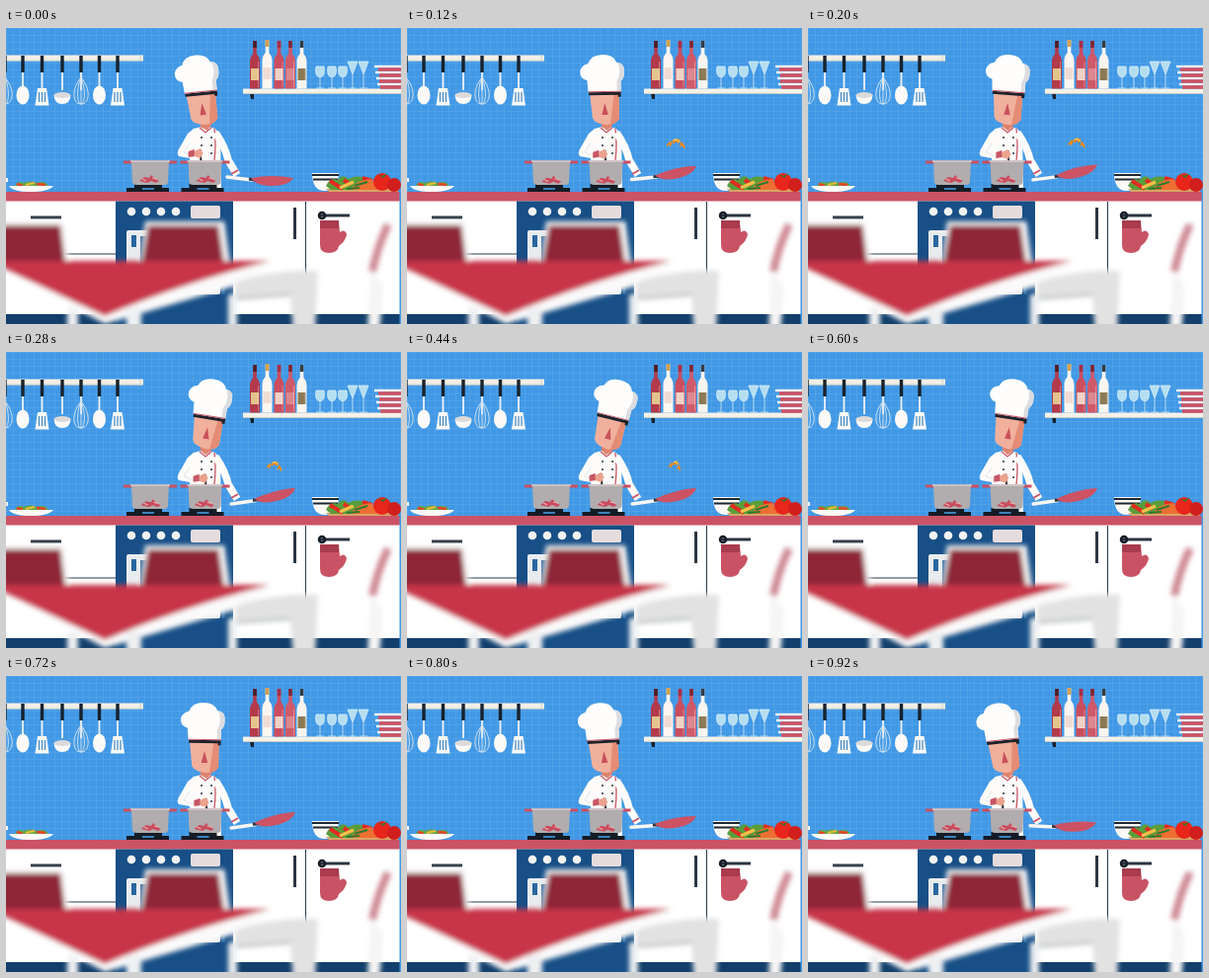
Recreate the animation shown at these times as an HTML page. Size 400x300 px, loop 0.96 s.

```html
<!DOCTYPE html>
<html lang="en">
<head>
<meta charset="utf-8">
<title>Chef</title>
<style>
html, body { margin: 0; width: 100%; height: 100%; overflow: hidden; background: #4198e5; }
svg { display: block; width: 100%; height: 100%; }
</style>
</head>
<body>
<svg viewBox="0 0 400 300">
  <defs>
    <pattern id="tiles" width="7" height="7" patternUnits="userSpaceOnUse">
      <path d="M0 .5H7M.5 0V7" stroke="#54a5ea" stroke-width=".7"/>
    </pattern>
    <filter id="blur" x="-10%" y="-30%" width="120%" height="160%"><feGaussianBlur stdDeviation="2.6"/></filter>
    <g id="handle"><path d="M0 42V63" stroke="#eef2f4" stroke-width="1.8"/><path d="M0 28V45" stroke="#17222d" stroke-width="3.4"/></g>
    <g id="spoon"><use href="#handle"/><ellipse cy="68" rx="6.5" ry="9.5" fill="#fbfaf8"/></g>
    <g id="spatula"><use href="#handle"/><path d="M-4.500 61H4.500L7 78.500H-7Z" fill="#fbfaf8"/><path d="M-3 65V75M0 65V75M3 65V75" stroke="#3f86bf" stroke-width="1.2"/></g>
    <g id="ladle"><use href="#handle"/><path d="M-8.500 68Q-8 77 0 77T8.500 68Z" fill="#fbfaf8"/><ellipse cy="68" rx="8.500" ry="3" fill="#dcdad8"/></g>
    <g id="whisk"><use href="#handle"/><path d="M0 50C-10 62-9 77 0 77S10 62 0 50C-5 62-4 77 0 77S5 62 0 50V77" fill="none" stroke="#dce9f2" stroke-width=".9"/></g>
    <g id="wine" fill="#b5def0" stroke="#d3edf6" stroke-width=".8"><path d="M-4 39H4Q6 49 0 50Q-6 49-4 39ZM0 50V61M-4 61H4"/></g>
    <g id="martini" fill="#b5def0" stroke="#d3edf6" stroke-width=".8"><path d="M-5 34H5L0 47ZM0 47V61M-4 61H4"/></g>
    <g id="stand" fill="#141c26"><path d="M-14 158H14V162H21V167H-22V162H-14Z"/><path d="M-6 163H6" stroke="#4ba3e8" stroke-width="1.500"/></g>
  </defs>

  <rect width="400" height="300" fill="#4198e5"/>
  <rect width="400" height="166" fill="url(#tiles)"/>

  <g id="rail">
    <rect y="27.500" width="139" height="6" fill="#f2f0e6"/><path d="M0 33H139" stroke="#cfd0c8"/>
    <path d="M136 27.500V33.500" stroke="#d2d2ca"/>
  </g>

  <g id="shelf">
    <path d="M247 66H251V72H248Z" fill="#1a222c"/>
    <rect x="240" y="61.500" width="160" height="5" fill="#f5f2e8"/><path d="M240 66.500H400" stroke="#cbcac0"/>
    <path d="M373 39H400M374 45H400M375 51H400M376 57H400" stroke="#fbf8f5" stroke-width="2.5"/>
    <path d="M377 42H400M378 48H400M378 54H400M379 60H400" stroke="#cf5263" stroke-width="3.5"/>
  </g>

  <g id="chef">
    <path d="M190 102Q202 98 212 102L217 109L218 166H187L186 132L175 130Q172 127 176 121L184 107Z" fill="#fdfcfa"/>
    <path d="M186 117L180 126L190 130" fill="none" stroke="#dadde1" stroke-width=".8"/>
    <path d="M196 101L202 106L208 101M211 102Q213 118 211 134" fill="none" stroke="#c75666" stroke-width="1.3"/>
    <g fill="#29323d"><circle cx="198" cy="111" r="1"/><circle cx="208" cy="111" r="1"/><circle cx="198" cy="119" r="1"/><circle cx="208" cy="119" r="1"/><circle cx="208" cy="127" r="1"/></g>
    <path d="M212 106Q222 120 225 134L234 149" fill="none" stroke="#fdfcfa" stroke-width="7.500"/>
    <path d="M228 148L235 144" stroke="#c75666" stroke-width="2"/>
    <g id="head">
      <path d="M197 92H208V99L203 104L197 100Z" fill="#e0836e"/>
      <path d="M185.500 66H215V92Q212 98 202 98Q190 97 188 91Z" fill="#f0b09c"/>
      <path d="M210 66H215V92Q213 97 206 98Z" fill="#e58c74"/>
      <path d="M200.500 76L204 88H197.500Z" fill="#c9505b"/>
      <path d="M184.500 64H217V70H214V68H184.500Z" fill="#1d232c"/>
      <path d="M184 65L183 53Q175 51 176 43Q178 37 184 36Q187 27 199 27Q210 27 213 35Q221 36 220.500 44Q221 51 217 54V65Z" fill="#fefdfb"/>
      <path d="M214 35Q221 36 220.500 44Q221 51 217 54V64H213V54Q218 46 214 35Z" fill="#dcdde0"/>
      <path d="M184 64.500H217" stroke="#c75666" stroke-width="1"/>
    </g>
    <g id="stir">
      <path d="M197 123L198 138" stroke="#252b34" stroke-width="2"/>
      <path d="M185 125L191 123L192 130L185 131Z" fill="#c75666"/>
      <path d="M191 125L197 122L200 127L197 132L191 130Z" fill="#eca28d"/>
    </g>
    <g id="pan">
      <path d="M224 151L249 154" stroke="#f9f6f2" stroke-width="3.500" stroke-linecap="round"/>
      <path d="M246 153L252 154" stroke="#2e3440" stroke-width="3"/>
      <path d="M248 152Q270 148 291 152Q286 160 270 160Q253 160 248 152Z" fill="#cd5263"/>
    </g>
    <g id="food">
      <path d="M-10 4Q-8-2-4-2L-5 4L-7 2ZM-4-2Q0-7 5-3L2 0L0-2L-3 1ZM5-2Q10 0 10 5L6 2L4 4Z" fill="#f08a1d"/>
      <path d="M-3-3L0-4L4-2" fill="none" stroke="#f9cf62" stroke-width="1.2"/>
    </g>
  </g>

  <g id="pots"></g>

  <g id="groceries">
    <path d="M0 152H2V156H0Z" fill="#f5f3ef"/>
    <path d="M9 160Q12 154 18 157Q25 154 31 157Q39 154 43 160Z" fill="#62a744"/>
    <path d="M11 158L17 160M31 158L40 159" stroke="#e8432a" stroke-width="2.5"/><path d="M20 159L29 157" stroke="#f0ba3d" stroke-width="2"/>
    <path d="M3 160H48Q43 166 25 166T3 160Z" fill="#fbf9f6"/>
    <path d="M310 147H337Q336 165 323 165T310 147Z" fill="#fbf9f6"/>
    <path d="M310 149H337M311 153.500H336" stroke="#1d2630" stroke-width="2"/>
    <path d="M324 163H397V167H328Z" fill="#d9a566"/>
    <path d="M324 160Q328 151 336 154Q341 147 347 153Q358 147 368 156L371 164H329Z" fill="#5a9e3b"/>
    <path d="M328 155L341 163M342 154L349 159M361 152L371 155" stroke="#e12c22" stroke-width="4"/>
    <path d="M338 162L352 156M362 163L372 158" stroke="#f3c14a" stroke-width="3.500"/>
    <path d="M350 164Q352 155 370 153L378 164Z" fill="#ee6f32"/>
    <path d="M353 160L366 156M345 163L358 162" stroke="#2f7a30" stroke-width="2"/>
    <circle cx="381" cy="156" r="9" fill="#e8261c"/><circle cx="393" cy="159" r="7" fill="#d11f1d"/>
    <path d="M376 148L381 150L387 147L382 152Z" fill="#2f7a30"/>
  </g>

  <g id="cabinets">
    <rect y="175" width="398.500" height="115" fill="#fff"/>
    <rect y="290" width="398.500" height="10" fill="#123f6b"/>
    <rect y="166" width="398.500" height="9.500" fill="#cb5365"/>
    <path d="M60 229H111M303.500 176V290" stroke="#26394a"/>
    <path d="M25 192H56M292.500 182V214" stroke="#2b3642" stroke-width="3"/>
    <rect x="111" y="175.500" width="119" height="125" fill="#174f86"/>
    <rect x="187" y="180" width="30" height="13" rx="2" fill="#e6dcde"/>
    <rect x="122" y="205" width="95" height="65" rx="2" fill="#e8ecef"/>
    <rect x="136" y="211" width="76" height="48" fill="#215f98"/>
    <rect x="127" y="210" width="5" height="12" fill="#2867a0"/>
    <path d="M220 198V270" stroke="#2f6fa8" stroke-width="3"/>
    <path d="M317 190H348" stroke="#2b3642" stroke-width="3"/>
    <circle cx="320" cy="190" r="3" fill="none" stroke="#141c26" stroke-width="2.5"/>
    <path d="M318 196H337L338 207Q343 203 345 209Q344 216 337 221Q336 228 327 228Q318 228 318 220Z" fill="#c95365"/>
    <path d="M318 195H337V203H318Z" fill="#a93b4e"/>
  </g>

  <g id="dining" filter="url(#blur)">
    <path d="M-10 196H58L65 245H-10ZM141 196H221L228 245H134Z" fill="#f5f3f2"/>
    <path d="M-10 200H55L60 240H-10ZM144 200H215L221 240H137Z" fill="#8e2538"/>
    <path d="M-10 240L100 300L240 259L268 238Z" fill="#fbfafa"/>
    <path d="M62 284H73V310H62ZM122 284H137V310H122ZM225 270H234V310H225Z" fill="#eef0f2"/>
    <path d="M232 258Q270 244 316 246L313 310H291L288 272L232 276Z" fill="#e2e2e2"/>
    <path d="M235 274L288 270" stroke="#bfc4c8" stroke-width="3"/>
    <path d="M392 196Q379 220 373 248L382 262L378 310H366L369 248Q377 215 386 196Z" fill="#f6f5f4"/>
    <path d="M387 199Q376 222 371 247" fill="none" stroke="#cf8a94" stroke-width="8"/>
    <path d="M-10 236H268Q180 258 100 292L-10 240Z" fill="#c83549"/>
  </g>
</svg>

<script>
const $ = id => document.getElementById(id);
const add = (id, markup) => $(id).insertAdjacentHTML('beforeend', markup);
const LOOP = 960, STEP = 40;

['whisk', 'spoon', 'spatula', 'ladle', 'whisk', 'spoon', 'spatula'].forEach((kind, i) =>
  add('rail', `<use href="#${kind}" x="${[-1, 17, 36.5, 57, 76, 94.5, 113][i]}"/>`));

const bottle = (x, top, body, neck, label) => add('shelf',
  `<path d="M${x - 1.8} ${top}h3.6v13q3 3 3.2 8V61.500h-10V${top + 21}q.2-5 3.2-8Z" fill="${body}"/>
   <path d="M${x} ${top}v7" stroke="${neck}" stroke-width="3.6"/>
   <path d="M${x - 4} ${top + 28}h8v12h-8Z" fill="${label}"/>
   <path d="M${x + 3.5} ${top + 21}V60" stroke="#fff" stroke-opacity=".3"/>`);
bottle(252, 13, '#b23a4b', '#4c1d27', '#e3c48c');
bottle(264.500, 12, '#fbf6f0', '#d6a04b', '#f1dcd4');
bottle(276.5, 13, '#cb4d5e', '#a92f46', '#f0d2c4');
bottle(288, 13, '#cf5a69', '#7d2634', '#dc8791');
bottle(299.500, 13, '#f8f4ee', '#333d47', '#8b7a55');
[318, 330, 341].forEach(x => add('shelf', `<use href="#wine" x="${x}"/>`));
[351, 362].forEach(x => add('shelf', `<use href="#martini" x="${x}"/>`));

const pot = (x, w) => add('pots',
  `<use href="#stand" x="${x - 2}"/>
   <path d="M${x - w - 8} 136h${2 * w + 16}" stroke="#c95163" stroke-width="3"/>
   <path d="M${x - w} 135h${2 * w}l-1 21q0 3-4 3h${10 - 2 * w}q-4 0-4-3Z" fill="#b1adae"/>
   <path d="M${x - w - 1} 135h${2 * w + 2}" stroke="#d5d1cf" stroke-width="1.500"/>
   <g class="stew"><path d="M${x - 10} 156l5-4 5 1 2-3 4 4 4 2-3 2-5-2-4 2Z" fill="#c94c5e"/>
   <path d="M${x - 7} 154l4 2M${x + 3} 153l5 1" stroke="#ebb0ac" stroke-width="1.2"/></g>`);
pot(146, 19);
pot(201.500, 17);
[127, 142, 157, 172].forEach(x => add('cabinets', `<circle cx="${x}" cy="186" r="4.300" fill="#f2f3f2"/>`));

// Linear interpolation through [time, value] keys.
function track(keys, t) {
  const i = keys.findIndex(key => key[0] > t);
  const [t0, a] = keys[i - 1], [t1, b] = keys[i];
  return a + (b - a) * (t - t0) / (t1 - t0);
}
const lift = [[0, 0], [120, .85], [240, 1], [720, 1], [920, .25], [960, 0]];
const toss = [[0, 152], [40, 140], [120, 117], [280, 115.500], [440, 115], [560, 140], [960, 152]];

function draw(now) {
  const t = Math.floor(now % LOOP / STEP) * STEP;
  const wave = (cycles, lead) => Math.cos(2 * Math.PI * cycles * (t + lead) / LOOP);
  const place = (id, transform) => $(id).setAttribute('transform', transform);
  const raise = track(lift, t), stir = wave(2, 20);
  place('head', `rotate(${4 - 10 * wave(1, 45)} 201 98)`);
  place('pan', `translate(${4 * raise} ${2 * raise}) rotate(${-15 * raise} 228 151)`);
  place('stir', `translate(${2.5 - 3 * stir} ${.5 - stir / 2})`);
  place('food', `translate(${272.5 - t / 400} ${track(toss, t)}) rotate(${t / 30}) scale(${1.1 - t / 1000} 1)`);
  $('food').style.display = t >= STEP && t < 600 ? '' : 'none';
  document.querySelectorAll('.stew').forEach((stew, i) =>
    stew.setAttribute('transform', `translate(${(i ? 1 : -1) * stir} ${-Math.abs(stir)})`));
  requestAnimationFrame(draw);
}
requestAnimationFrame(draw);
</script>
</body>
</html>
```
